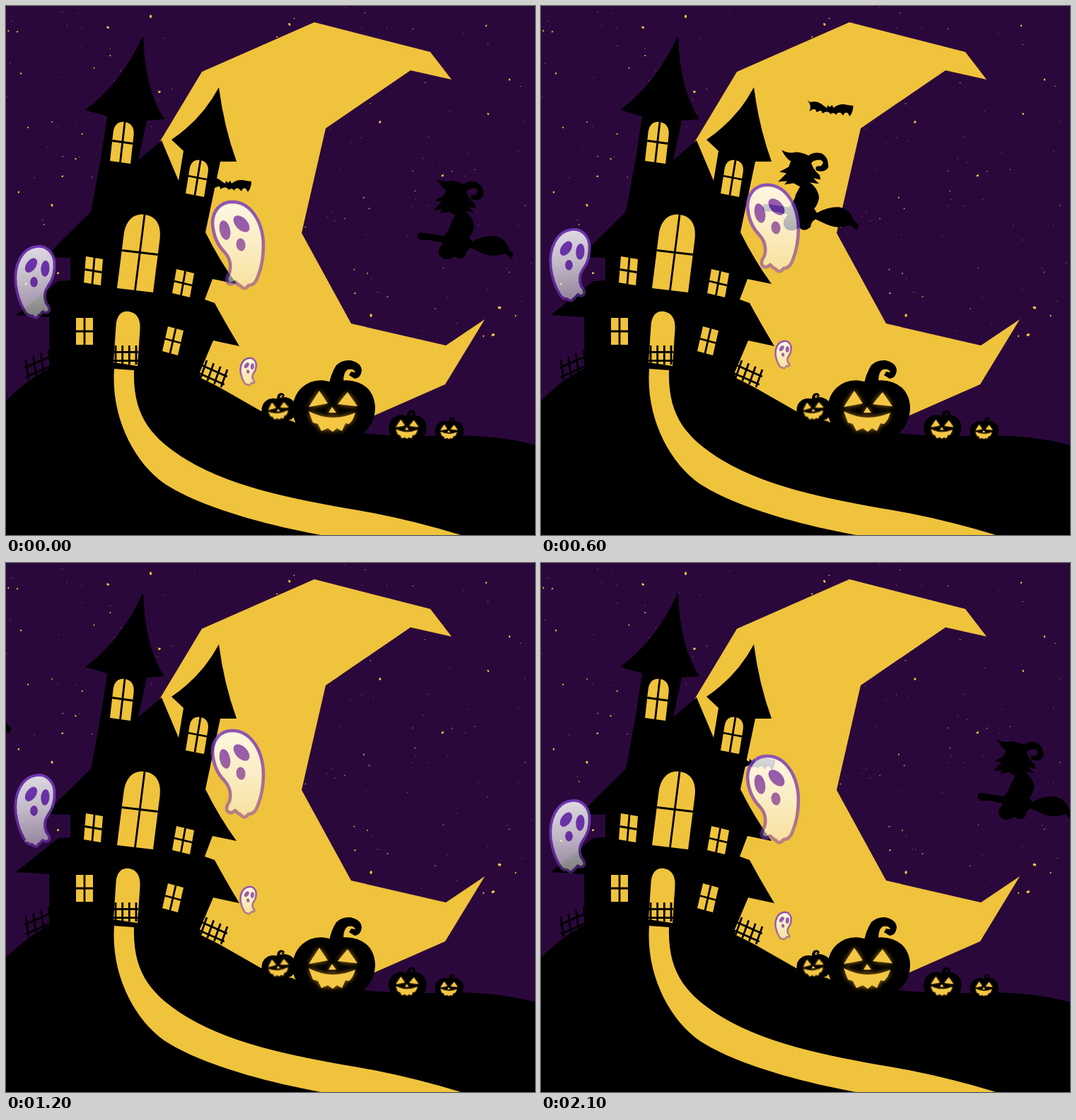
Write an HTML page that moves like this. It is 748 px wide and 748 px high and loops after 2.2 s.

```html
<!DOCTYPE html>
<html lang="en">
<head>
<meta charset="utf-8">
<title>Haunted house</title>
<style>
html, body { margin: 0; width: 100%; height: 100%; overflow: hidden; background: #2b083c; }
svg { display: block; width: 100vw; height: 100vh; }
.gold { fill: #f0c33c; }
.bars, .fence { fill: none; stroke: #000; stroke-width: 2.8; }
</style>
</head>
<body>
<svg viewBox="0 0 748 748" xmlns="http://www.w3.org/2000/svg">
  <defs>
    <linearGradient id="fade" x1="0" y1="0" x2="0" y2="1">
      <stop offset="0" stop-color="#fff" stop-opacity=".87"/>
      <stop offset=".45" stop-color="#fff" stop-opacity=".72"/>
      <stop offset="1" stop-color="#fff" stop-opacity=".46"/>
    </linearGradient>
    <mask id="veil" maskUnits="userSpaceOnUse" x="280" y="268" width="96" height="142">
      <rect x="280" y="268" width="96" height="142" fill="url(#fade)"/>
    </mask>
    <filter id="glow" x="-30%" y="-40%" width="160%" height="180%">
      <feDropShadow dx="0" dy="0" stdDeviation="3.5" flood-color="#e8a424" flood-opacity=".8"/>
    </filter>
    <g id="ghost" mask="url(#veil)">
      <path fill="#fff" stroke="#7d3fc8" stroke-linejoin="round"
        d="M320 277C303 277 292 290 292 307C293 325 299 338 309 348C317 357 319 366 316 377Q310 386 313 391Q318 396 324 390Q329 395 332 396Q337 403 343 395Q352 395 356 383C363 366 364 352 364 338C363 302 344 277 320 277Z"/>
      <g fill="#7d3fc8">
        <ellipse cx="309.500" cy="317" rx="7.500" ry="14" transform="rotate(-12 309.500 317)"/>
        <ellipse cx="333" cy="308" rx="8.500" ry="14" transform="rotate(-43 333 308)"/>
        <ellipse cx="332" cy="337.500" rx="6.500" ry="9" transform="rotate(-8 332 337)"/>
      </g>
    </g>
    <path id="rind" d="M-2 -37Q16 -44 33 -38Q56 -30 58 -3Q58 22 39 36Q1 48 -41 36Q-58 22 -59 1Q-58 -27 -34 -38Q-18 -44 -2 -37Z"/>
    <path id="stem" d="M-8 4Q-5 -15 3 -27Q11 -35 23 -34Q38 -31 39 -20Q38 -9 29 -8L21 -13L24 -18L30 -17Q28 -23 19 -21Q11 -15 14 3Z"/>
    <path id="face" fill="#f4c744" filter="url(#glow)"
      d="M-21 -26L-9 -8L-36 -3ZM19 -24L33 -4L5 -7ZM-3 -3L3 5L-8 5ZM-36 3Q-3 20 30 5Q27 16 21 21L16 20L11 31L4 27L-2 32L-9 27L-18 31L-23 21L-30 19Z"/>
  </defs>

  <rect width="748" height="748" fill="#2b083c"/>
  <g id="stars" class="gold"></g>
  <path class="gold" d="M436 23L600 65L630 104L572 91L452 173L418 321L488 449L622 480L677 443L621 535L521 579L400 625L230 560L215 400L200 222L218 191L277 93Z"/>

  <path id="witch" d="M609 244Q619 250 630 247Q640 248 647 252Q655 246 666 249Q676 255 675 269Q669 277 658 273Q655 266 664 267Q671 262 664 258Q653 258 651 263Q654 272 663 280L664 286L654 284L662 292L649 290Q661 299 662 312Q660 322 655 327L659 333Q676 324 691 325Q706 328 711 343L718 351L715 358L706 350Q690 357 672 349L657 342Q650 346 650 353Q641 361 634 354Q624 361 616 356Q609 350 613 342L618 335L598 331L586 331Q578 325 585 320L619 325Q628 315 629 307L635 296L626 291L613 293L617 288L604 289L616 277L606 275L619 268L622 260Q615 256 609 244Z"/>
  <path id="bat" d="M-32 -12L-28 -9Q-17 -12 -9 -4L-4 -1L-3 -5L0 -2L3 -5L5 -1Q14 -8 25 -5L33 -4Q33 5 28 11L25 6Q20 5 19 10L15 6Q10 5 9 9Q5 4 1 8Q-2 3 -7 5L-11 7Q-11 1 -16 4L-19 5Q-20 0 -24 1L-29 4Q-25 -4 -32 -12Z"/>

  <path d="M194 41Q196 118 224 160L199 162L187 218L220 190L244 247L251 205L234 189Q277 160 301 115Q308 170 326 220L303 220L282 320Q302 360 326 393L292 386L281 415L295 420Q309 446 330 481L293 473L274 518L280 580L62 580L61 440L14 437L74 389L91 388L91 356L57 355L75 335L120 291L134 216L143 156L112 147Q164 108 194 41Z"/>
  <path d="M0 558Q32 526 64 511L260 519Q285 530 305 541L361 573Q380 582 405 587L440 604L505 604Q555 609 600 608Q690 604 748 621V748H0Z"/>
  <path class="gold" d="M153 513L181 515C179 580 206 611 256 642C330 686 430 701 520 717Q585 730 643 748H445C360 732 275 708 225 676C180 645 148 580 153 513Z"/>
  <g id="house"></g>
  <g id="pumpkins"></g>

  <g id="ghosts" stroke-width="4.6">
    <use href="#ghost"/>
    <use href="#ghost" transform="rotate(-8 43 391) translate(310.300 114.900) scale(-.815 .815)"/>
    <use href="#ghost" stroke-width="8" transform="translate(343.500 517) rotate(-10) scale(-.33 .31) translate(-328 -338)"/>
  </g>
</svg>
<script>
const LOOP = 2200, STEP = 100;
const $ = id => document.getElementById(id);
const add = (id, markup) => { $(id).innerHTML += markup; };

// u runs along the sill, v runs up from its left end
function addWindow(x, y, [ux, uy], [vx, vy], arched, crossed = true) {
  const p = (a, b) => `${x + a * ux + b * vx} ${y + a * uy + b * vy} `;
  const top = arched
    ? `L${p(0, .7)}C${p(0, .9)}${p(.2, 1)}${p(.5, 1)}C${p(.8, 1)}${p(1, .9)}${p(1, .7)}`
    : `L${p(0, 1)}L${p(1, 1)}`;
  add("house", `<path class="gold" d="M${p(0, 0)}${top}L${p(1, 0)}Z"/>`);
  if (crossed) add("house", `<path class="bars" d="M${p(.5, 0)}L${p(.5, 1)}M${p(0, .5)}L${p(1, .5)}"/>`);
}

function addFence(x, y, [ux, uy], [vx, vy]) {
  const p = (a, b) => `${x + a * ux + b * vx} ${y + a * uy + b * vy} `;
  let d = "";
  for (let i = 0; i < 4; i++) d += `M${p(i / 3, 0)}L${p(i / 3, 1)}`;
  for (const h of [.35, .8]) d += `M${p(-.1, h)}L${p(1.1, h)}`;
  add("house", `<path class="fence" d="${d}"/>`);
}

function addPumpkin(x, y, size, stem, turn = 0) {
  add("pumpkins", `<g transform="translate(${x} ${y}) rotate(${turn}) scale(${size})">
    <use href="#stem" transform="translate(0 -35) scale(${stem})"/><use href="#rind"/><use href="#face"/></g>`);
}

function addStars(count) {
  let seed = 31, markup = "";
  const random = () => (seed = seed * 16807 % 2147483647) / 2147483647;
  for (let i = 0; i < count; i++) {
    const r = .5 + 2 * random() ** 5;
    markup += `<ellipse rx="${r}" ry="${r * .75}"
      transform="translate(${random() * 748} ${random() * 470}) rotate(${random() * 180})"/>`;
  }
  add("stars", markup);
}

addStars(210);
addWindow(147, 219, [29, 4], [6.5, -57], true);
addWindow(254, 265, [26, 5], [8, -49.5], true);
addWindow(157, 399, [51, 6], [13.5, -107], true);
addWindow(152, 504, [34, 5], [5, -74.5], true, false);
addWindow(110, 391, [24, 4], [3, -37]);
addWindow(235, 406, [25, 6], [6, -34]);
addWindow(99, 479, [24, 0], [0, -38]);
addWindow(221, 488, [22, 6], [8, -35]);
addFence(28, 500, [32, -14], [4, 29]);
addFence(284, 501, [29, 13], [-9, 25]);
addFence(155, 480, [29, 0], [0, 27]);
addPumpkin(464, 570, 1, 1);
addPumpkin(386, 571, .42, .6, -6);
addPumpkin(568, 597, .46, .6);
addPumpkin(627, 601, .35, .6);

function place(id, x, y) {
  $(id).setAttribute("transform", `translate(${x} ${y})`);
}

function draw(ms) {
  const t = Math.floor((ms % LOOP) / STEP) * STEP;
  // flights run through the loop point and speed up as they go
  const s = (t < 1500 ? t : t - LOOP) / 400;
  const fly = -(145 * s + 15 * s ** 2 + 5.2 * s ** 3);
  place("witch", fly, fly * .143 - fly ** 2 * 3e-5);
  place("bat", 314 + 63 * s, 252 - 102.7 * s + 62.3 * s ** 2 - 27.6 * s ** 3);
  place("ghosts", 0, -44 * (1 - Math.abs(1 - t / (LOOP / 2))));
}

let start;
function tick(now) {
  start ??= now;
  draw(now - start);
  requestAnimationFrame(tick);
}
draw(0);
requestAnimationFrame(tick);
</script>
</body>
</html>
```
